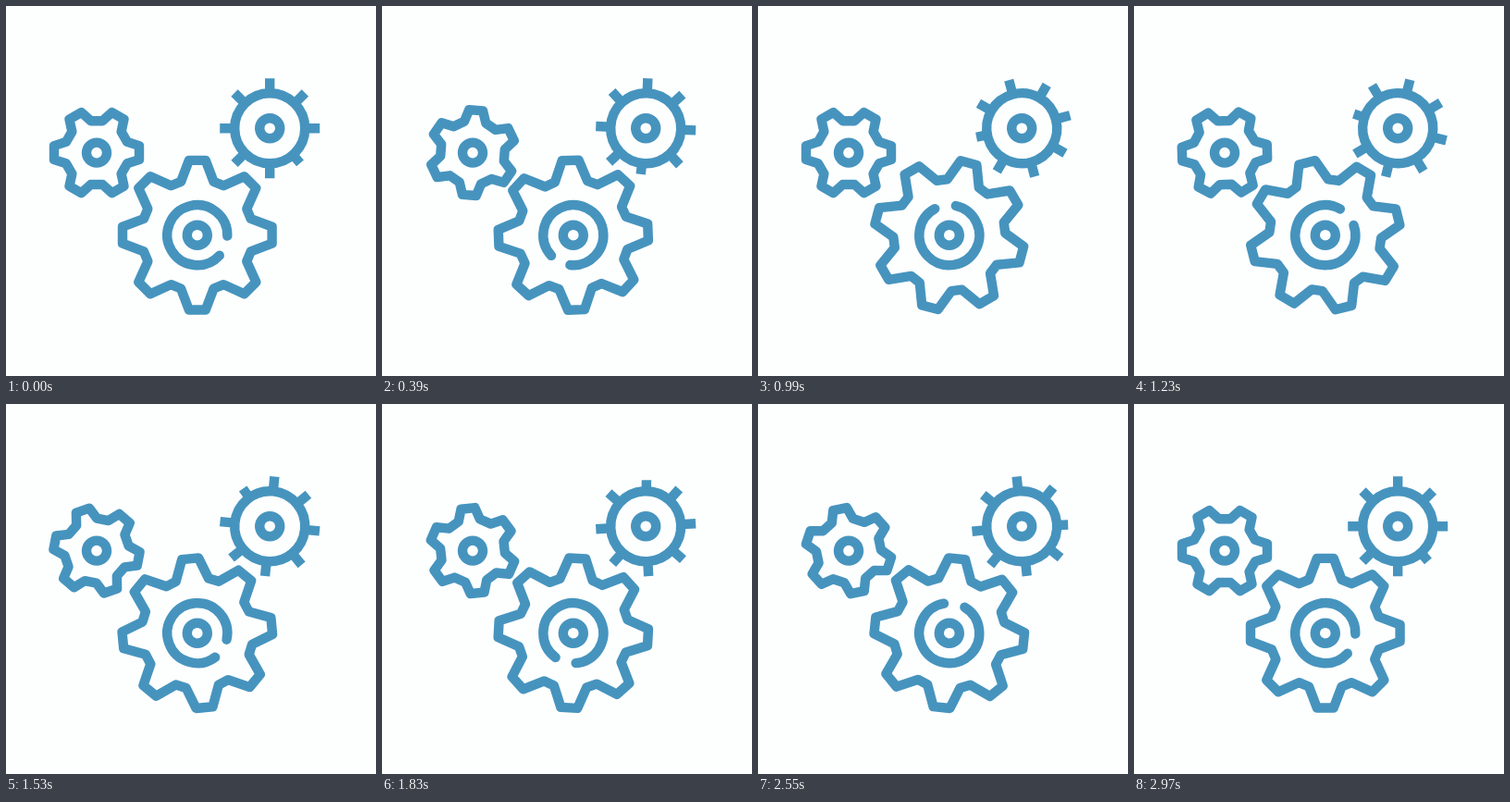
Recreate the animation shown at these times as an HTML page. Size 400 by 400 pixels, loop 3030 ms.

```html
<!DOCTYPE html>
<html lang="en">
<head>
<meta charset="utf-8">
<title>Turning gears</title>
<style>
  html, body { margin: 0; width: 100%; height: 100%; overflow: hidden; background: #fdfefe; }
  svg { display: block; width: 100vw; height: 100vh; }
</style>
</head>
<body>
<svg viewBox="0 0 400 400" fill="none" stroke="#4694be" stroke-width="10.4" stroke-linejoin="round">
  <g transform="translate(206.8 247.7)">
    <path id="bigGear"/>
    <path id="arc" stroke-linecap="round"/>
    <circle r="11"/>
  </g>
  <g transform="translate(98 158.6)">
    <path id="smallGear"/>
    <circle r="11"/>
  </g>
  <g transform="translate(285.2 132.2)">
    <g id="spikedWheel"><circle r="38"/><path id="spikes"/></g>
    <circle r="11"/>
  </g>
</svg>
<script>
const STEP = 30, LOOP = 3030, LAST = 99;
const el = id => document.getElementById(id);

const polar = (radius, degrees) => {
  const a = degrees * Math.PI / 180;
  return [radius * Math.cos(a), radius * Math.sin(a)].map(v => v.toFixed(2)).join(' ');
};

// Each tooth: root, two tip corners, root.
function gearPath(teeth, tipRadius, tipHalfWidth, rootRadius, rootAngle) {
  const tipAngle = Math.atan2(tipHalfWidth, tipRadius) * 180 / Math.PI;
  const cornerRadius = Math.hypot(tipRadius, tipHalfWidth);
  const points = [];
  for (let i = 0; i < teeth; i++) {
    const a = i * 360 / teeth;
    points.push(
      polar(rootRadius, a - rootAngle), polar(cornerRadius, a - tipAngle),
      polar(cornerRadius, a + tipAngle), polar(rootRadius, a + rootAngle));
  }
  return 'M' + points.join('L') + 'Z';
}

// The lower right spike is shorter and sits slightly askew.
function spikePath() {
  const spike = (angle, length) => `M${polar(38, angle)}L${polar(length, angle)}`;
  let d = '';
  for (let i = 0; i < 8; i++) d += i === 1 ? spike(49, 50) : spike(i * 45, 54);
  return d;
}

el('bigGear').setAttribute('d', gearPath(8, 80.8, 9, 60.5, 17));
el('smallGear').setAttribute('d', gearPath(6, 46, 7.5, 35, 19.5));
el('spikes').setAttribute('d', spikePath());
el('arc').setAttribute('d', `M${polar(32.5, 42.5)}A32.5 32.5 0 1 1 ${polar(32.5, 1.5)}`);

const turns = { bigGear: -1, arc: 2, smallGear: 2, spikedWheel: 1 };

function draw(time) {
  const progress = Math.min(Math.floor(time % LOOP / STEP), LAST) / LAST;
  for (const id in turns) el(id).setAttribute('transform', `rotate(${360 * turns[id] * progress})`);
}

function tick() {
  draw(performance.now());
  requestAnimationFrame(tick);
}
tick();
</script>
</body>
</html>
```
